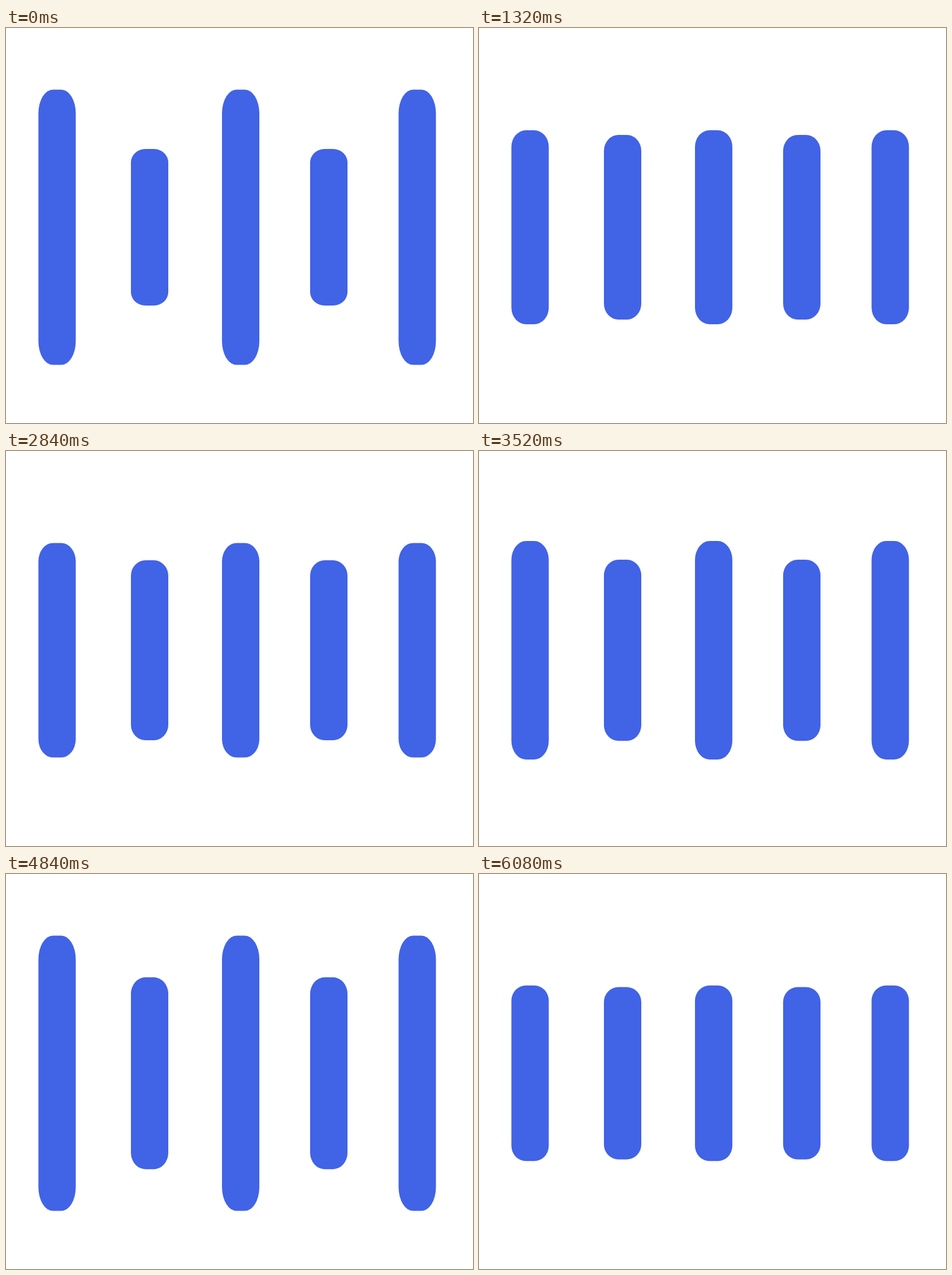
An HTML page for the animation above (6.12 s loop, 800 by 676 pixels).

```html
<!DOCTYPE html>
<html lang="en">
<head>
<meta charset="utf-8">
<title>Pulsing bars</title>
<style>
  html, body { margin: 0; width: 100%; height: 100%; overflow: hidden; background: #fff; }
  svg { display: block; width: 100vw; height: 100vh; }
  rect { fill: #4163e6; }
</style>
</head>
<body>
<svg viewBox="0 0 800 676"></svg>
<script>
const LOOP = 6120, STEP = 40, CYCLE = 341;
const WIDTH = 64, CENTER = 341, ROUND_X = 25, ROUND_Y = 0.086;

const progress = (t, from, to) => Math.min(1, Math.max(0, (t - from) / (to - from)));
const smooth = x => x * x * (3 - 2 * x);
const bump = (t, from, to) => Math.sin(Math.PI * progress(t, from, to));

// Outer bars stay tall, drop smoothly, then speed up on the way back.
function outerHeight(t) {
  const fall = smooth(progress(t, 66, 156));
  const rise = progress(t, 260, CYCLE) ** 1.5;
  return 270 + 201 * (1 - fall + rise);
}

// Inner bars beat three times per cycle: small, large, small.
function innerHeight(t) {
  const beat = 0.345 * bump(t, 0, 145) + 1.015 * bump(t, 145, 271) + 0.295 * bump(t, 271, CYCLE);
  return 268 + 177 * beat;
}

const svg = document.querySelector("svg");

function setAll(node, attrs) {
  for (const name in attrs) node.setAttribute(name, attrs[name]);
}

const bars = [55.5, 214, 370, 521, 672.5].map((x, i) => {
  const rect = document.createElementNS("http://www.w3.org/2000/svg", "rect");
  setAll(rect, { x, width: WIDTH, rx: ROUND_X });
  svg.append(rect);
  return { rect, heightAt: i % 2 ? innerHeight : outerHeight };
});

function draw(time) {
  const t = Math.floor(time % LOOP / STEP) * STEP % CYCLE;
  for (const { rect, heightAt } of bars) {
    const height = heightAt(t);
    // The corners stretch along with the bar.
    setAll(rect, { y: CENTER - height / 2, height, ry: height * ROUND_Y });
  }
}

const start = performance.now();
function tick() {
  draw(performance.now() - start);
  requestAnimationFrame(tick);
}
tick();
</script>
</body>
</html>
```
